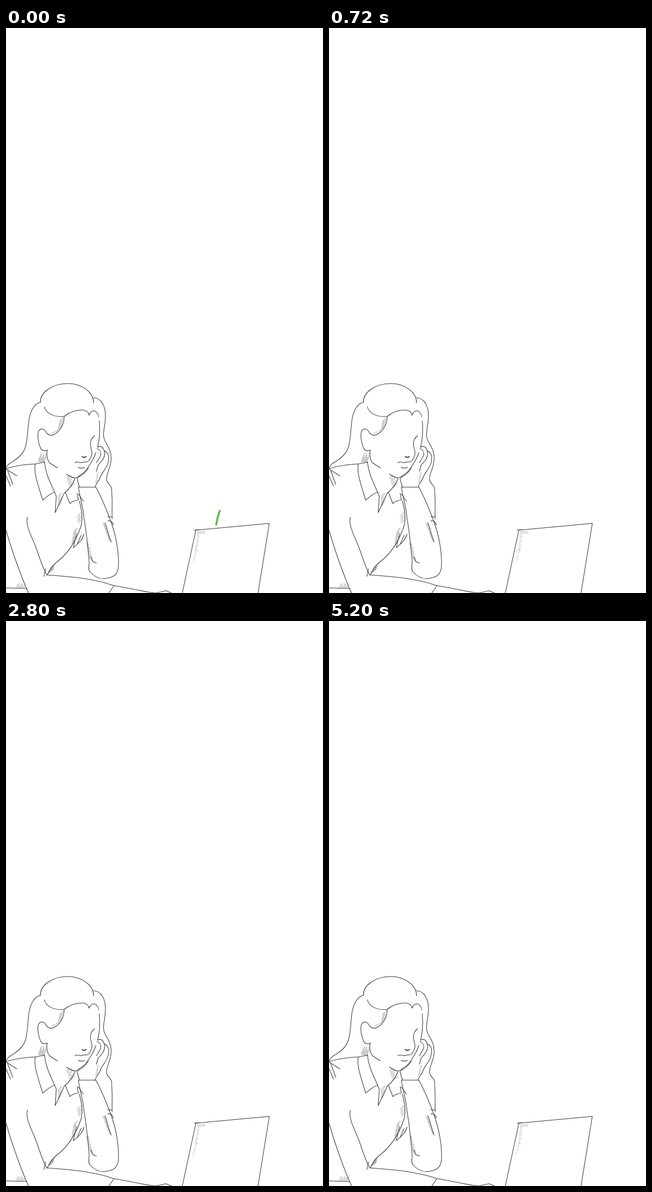
Recreate the animation shown at these times as an HTML page. Size 561 px wide and 998 px high, loop 6240 ms.

```html
<!DOCTYPE html>
<html lang="en">
<head>
<meta charset="utf-8">
<title>Mail from the laptop</title>
<style>
  html, body { margin: 0; width: 100%; height: 100%; overflow: hidden; background: #fff; }
  svg { display: block; width: 100vw; height: 100vh; }
  path { fill: none; stroke-linecap: round; stroke-linejoin: round; }
  #ink { stroke: #3c3c3c; stroke-width: 1.05; }
  #hatch { stroke: #777; stroke-width: .6; }
  .trail { stroke-width: 3.5; }
  #mail path, #mail rect { vector-effect: non-scaling-stroke; stroke-width: .8; }
  #scene { --a: #075a93; --b: #66b746; --line: #17364e; }
  #scene.green { --a: #66b746; --b: #075a93; --line: #345f27; }
  .a { stroke: var(--a); }
  .b { stroke: var(--b); }
  #mail rect { fill: var(--a); stroke: var(--line); }
  #mail .fold { stroke: var(--line); }
  #mail .wear { stroke: #7f98a8; stroke-dasharray: 2 2 1 3; }
  .green .wear { display: none; }
</style>
</head>
<body>
<svg viewBox="0 0 561 998">
  <g id="scene">
    <path class="trail a" id="left" d="M352 839C354 822 359 809 368 795C395 753 430 708 470 676"/>
    <path class="trail b" id="mid" d="M372 877C377 843 396 815 424 794C452 774 497 727 564 712"/>
    <path class="trail a" id="right" d="M392 880C397 866 409 842 431 824C465 796 515 770 564 748"/>
    <g id="mail">
      <rect width="104" height="78"/>
      <path class="fold" d="M0 0L46 50Q48 52 50 52H58Q60 52 62 50L104 0M0 78L37 41M104 78L67 41"/>
      <path class="wear" d="M3 2L9 10L16 14M4 6L14 17M9 68L13 62"/>
    </g>
  </g>
  <path id="hatch"/>
  <g id="ink">
    <!-- hair -->
    <path d="M61 661C60 645 80 628 109 628C134 628 155 643 155 662"/>
    <path d="M61 661C50 664 44 675 41 690C38 708 39 722 35 738C31 754 18 762 8 768C2 772 0 776 -1 780"/>
    <path d="M155 653C169 654 176 668 176 685C176 705 169 717 175 729C181 740 187 748 186 763C185 779 176 789 178 799C181 808 188 806 187 820"/>
    <path d="M68 669C70 680 84 688 103 686C112 679 125 674 138 675C144 677 147 680 147 684C150 676 157 673 162 681Q164 683 164 687"/>
    <path d="M165 694C167 712 166 725 162 741"/>
    <!-- face -->
    <path d="M103 686C103 700 96 712 85 718C78 722 72 717 69 711C66 707 59 707 57 714C55 725 59 739 63 745Q67 748 73 746"/>
    <path d="M73 745C71 756 74 764 77 768L91 777M107 788C114 793 123 797 129 793Q139 788 146 777"/>
    <path d="M157 720C149 726 148 735 151 744C154 752 151 759 146 765"/>
    <path d="M122 768C127 764 132 770 136 767L145 766M128 776Q133 779 139 776"/>
    <path d="M135 757Q138 760 142 757" stroke-width="1.8"/>
    <!-- hand -->
    <path d="M163 740C170 737 172 742 174 747C181 750 183 757 181 766C179 778 170 784 167 793C164 802 158 806 158 811"/>
    <path d="M159 750C155 764 148 771 141 782C135 789 126 790 126 797L130 811M161 743C168 746 169 750 167 756L160 768M174 747C177 758 169 766 163 772L160 783"/>
    <!-- sleeve -->
    <path d="M128 811H159C169 829 182 860 189 882C197 906 200 935 199 951C198 966 190 970 178 972C165 975 154 967 149 961C144 956 148 949 147 941C145 918 143 893 138 866C137 848 131 830 128 811"/>
    <path d="M128 823L137 836M150 934L154 943L160 945M187 821C189 840 187 854 188 867M180 863L188 864M180 871Q187 868 190 878M175 874C180 886 182 899 186 908"/>
    <!-- collar and shirt -->
    <path d="M-1 779C12 774 32 771 52 770L68 767M52 770C48 784 58 811 65 834C72 828 78 822 86 820C80 805 70 789 68 766"/>
    <path d="M86 820L89 827L87 856L103 822C112 814 119 806 122 796M105 820L113 840Q120 834 128 834L126 822"/>
    <path d="M130 836C134 850 136 866 133 879C124 907 108 930 88 945C80 952 76 959 73 966"/>
    <path d="M125 893L119 918C126 912 135 906 138 894M133 896L126 912"/>
    <path d="M0 779L19 791M3 782L12 806M0 791L8 809"/>
    <!-- arms and desk -->
    <path d="M38 864C34 876 43 894 50 910C58 929 62 948 72 966M70 955L67 969M0 887C10 922 22 955 34 985L40 998M0 989L37 990"/>
    <path d="M72 966C101 968 151 971 191 985C219 989 241 996 265 998L283 994L293 998M191 985L182 998"/>
    <!-- laptop -->
    <path d="M312 998L336 887L466 875L446 998M333 887L341 886"/>
  </g>
</svg>
<script>
const LOOP = 6240, STEP = 80;
const bursts = [
  { start: 0, show: 0 },
  { start: 2120, show: 2160, green: true },
  { start: 4480, show: 4560 }
];
const $ = id => document.getElementById(id);
const scene = $('scene'), mail = $('mail');

// Each trail grows from `grow`; its tail follows from `trim`.
const trails = [['left', 74, 205], ['mid', -46, 83], ['right', 34, 165]]
  .map(([id, grow, trim]) => ({ el: $(id), grow, trim, len: $(id).getTotalLength() }));

// A run of n short strokes (dx, dy) between two points.
function hatch(x1, y1, x2, y2, n, dx, dy) {
  let d = '';
  for (let i = 0; i < n; i++) {
    const k = i / (n - 1), s = .75 + .25 * Math.sin(i * 2.3);
    d += `M${x1 + (x2 - x1) * k} ${y1 + (y2 - y1) * k}l${dx * s} ${dy * s}`;
  }
  return d;
}
$('hatch').setAttribute('d', [
  [95, 694, 92, 710, 9, 8, -7],
  [80, 717, 90, 712, 5, 2, -3],
  [57, 766, 67, 768, 8, 6, -17],
  [107, 794, 113, 811, 10, 9, -6],
  [92, 828, 92, 845, 8, 8, -9],
  [158, 804, 161, 787, 8, 4, -3],
  [126, 862, 128, 875, 7, 8, -8],
  [120, 890, 116, 912, 10, 7, -9],
  [171, 874, 182, 904, 15, 5, 4],
  [142, 909, 149, 939, 15, 6, 3],
  [76, 963, 83, 957, 7, 4, -12],
  [18, 988, 31, 989, 7, 4, -8],
  [338, 889, 350, 889, 6, 4, 5],
  [339, 893, 335, 920, 10, 4, 4],
  [335, 923, 331, 943, 6, 3, -2]
].map(a => hatch(...a)).join(''));

function drawTrail({ el, grow, trim, len }, p) {
  const tip = Math.min(len, (p - grow) * .545);
  const tail = Math.max(0, (p - trim) * .48);
  const on = tip > tail;
  el.style.display = on ? '' : 'none';
  if (on) el.setAttribute('stroke-dasharray', `0 ${tail} ${tip - tail} ${len + 10}`);
}

function drawMail(p) {
  const q = p - 80;
  const x = 390 + .36 * q + .00004 * q * q;
  const y = 748 - .487 * q + .0003 * q * q;
  mail.style.display = p >= 40 ? '' : 'none';
  mail.setAttribute('transform', `translate(${x} ${y}) scale(${1 + q * .00072})`);
}

function frame(now) {
  const t = Math.floor(now % LOOP / STEP) * STEP;
  const burst = bursts.find(b => t >= b.show && t <= b.start + 640);
  scene.style.display = burst ? '' : 'none';
  if (burst) {
    const p = t - burst.start;
    scene.classList.toggle('green', !!burst.green);
    trails.forEach(tr => drawTrail(tr, p));
    drawMail(p);
  }
}

const t0 = performance.now();
function tick() {
  frame(performance.now() - t0);
  requestAnimationFrame(tick);
}
tick();
</script>
</body>
</html>
```
